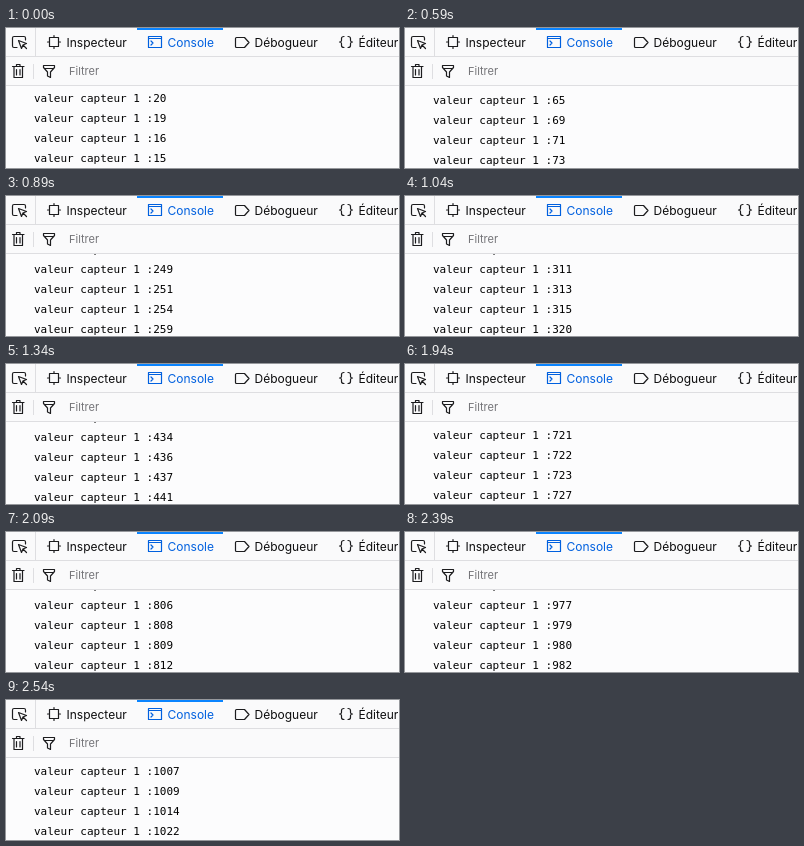
An HTML page that plays this animation: 393 px wide and 140 px high, repeating every 5150 ms.

```html
<!DOCTYPE html>
<html lang="fr">
<head>
<meta charset="utf-8">
<title>Console</title>
<style>
html, body { margin: 0; width: 100%; height: 100%; overflow: hidden; background: #fcfcfd; }
svg { display: block; }
.log { font: 11px "DejaVu Sans Mono", monospace; fill: #000; }
.ui { font: 12px Inter, sans-serif; fill: #0c0c0d; }
.icon { fill: none; stroke: #1c1c1e; stroke-width: 1.2; stroke-linejoin: round; stroke-linecap: round; }
.icon.on { stroke: #0060df; }
</style>
</head>
<body>
<svg width="393" height="140" viewBox="0 0 393 140">
  <g id="log" class="log"></g>

  <rect width="393" height="58" fill="#fafafb"/>
  <path d="M0 28.5H393M0 57.5H393M29.5 0V28M27.5 36V51" stroke="#dedee1"/>
  <rect x="131" width="86" height="2" fill="#0a84ff"/>

  <g class="ui">
    <text x="60.5" y="19">Inspecteur</text>
    <text x="161.5" y="19" fill="#0060df">Console</text>
    <text x="248.5" y="19">Débogueur</text>
    <text x="352.5" y="19">Éditeur de style</text>
    <text x="63" y="47" font-size="11" fill="#747478">Filtrer</text>
  </g>

  <!-- element picker -->
  <path class="icon" d="M11 19.5H8Q6.5 19.5 6.5 18V10Q6.5 8.5 8 8.5H18Q19.5 8.5 19.5 10V12"/>
  <path class="icon" d="M12.5 12.5L20.5 15.5L17 17L15.5 20.5ZM17 17L20.5 20.5"/>
  <!-- inspector -->
  <path class="icon" d="M43.5 9.5H52.5V18.5H43.5ZM48 7.5V9M48 19V20.5M41.5 14H43M53 14H54.5"/>
  <!-- console -->
  <path class="icon on" d="M142.5 8.5H155.5V19.5H142.5ZM142.5 10.5H155.5M145 13L147 15L145 17"/>
  <!-- debugger -->
  <path class="icon" d="M230.5 9.5H238.5L243 14.5L238.5 19.5H230.5Q229.5 19.5 229.5 18.5V10.5Q229.5 9.5 230.5 9.5Z"/>
  <!-- style editor -->
  <path class="icon" d="M338 8.5Q335.5 8.5 335.5 10.5V12.5Q335.5 14 333.5 14Q335.5 14 335.5 15.5V17.5Q335.5 19.5 338 19.5M342 8.5Q344.5 8.5 344.5 10.5V12.5Q344.5 14 346.5 14Q344.5 14 344.5 15.5V17.5Q344.5 19.5 342 19.5"/>
  <!-- trash -->
  <path class="icon" d="M6.5 38.5H18M10.5 38V36.5H14V38M8 39V49.5H16.5V39M10.5 41.5V47M14 41.5V47"/>
  <!-- filter -->
  <path class="icon" d="M37.5 37.5H48.5V39.5L44.5 44V49.5L41.5 48V44L37.5 39.5ZM38.5 40.5H47.5"/>
</svg>
<script>
const LOOP = 5150, START = 590, STEP = 150, SCROLLED = 3;

// key steps: the four visible readings and the scroll shift in pixels
const keys = [
  { step: 0, shift: 0, rows: [20, 19, 16, 15] },
  { step: 1, shift: 2, rows: [65, 69, 71, 73] },
  { step: 3, shift: 3, rows: [249, 251, 254, 259] },
  { step: 6, shift: 3, rows: [434, 436, 437, 441] },
  { step: 10, shift: 1, rows: [721, 722, 723, 727] },
  { step: 13, shift: 3, rows: [977, 979, 980, 982] },
  { step: 14, shift: 1, rows: [1007, 1009, 1014, 1022] }
];
const lastStep = keys[keys.length - 1].step;

const log = document.getElementById("log");
let shown = -1;

// readings rise linearly between key steps
function stateAt(step) {
  const next = keys.findIndex(k => k.step >= step);
  const b = keys[next];
  if (b.step === step) return b;
  const a = keys[next - 1];
  const p = (step - a.step) / (b.step - a.step);
  return { shift: SCROLLED, rows: a.rows.map((v, i) => Math.round(v + (b.rows[i] - v) * p)) };
}

function line(value, row, shift) {
  return `<text x="28" y="${74 + 20 * row + shift}">valeur capteur 1 :${value}</text>`;
}

function draw(now) {
  const t = now % LOOP;
  const step = t < START ? 0 : Math.min(lastStep, 1 + Math.floor((t - START) / STEP));
  if (step === shown) return;
  shown = step;
  const { shift, rows } = stateAt(step);
  // the line above is scrolled almost entirely under the toolbar
  log.innerHTML = [rows[0] - 2, ...rows].map((v, i) => line(v, i - 1, shift)).join("");
}

const begin = performance.now();
function tick() {
  draw(performance.now() - begin);
  requestAnimationFrame(tick);
}
tick();
</script>
</body>
</html>
```
